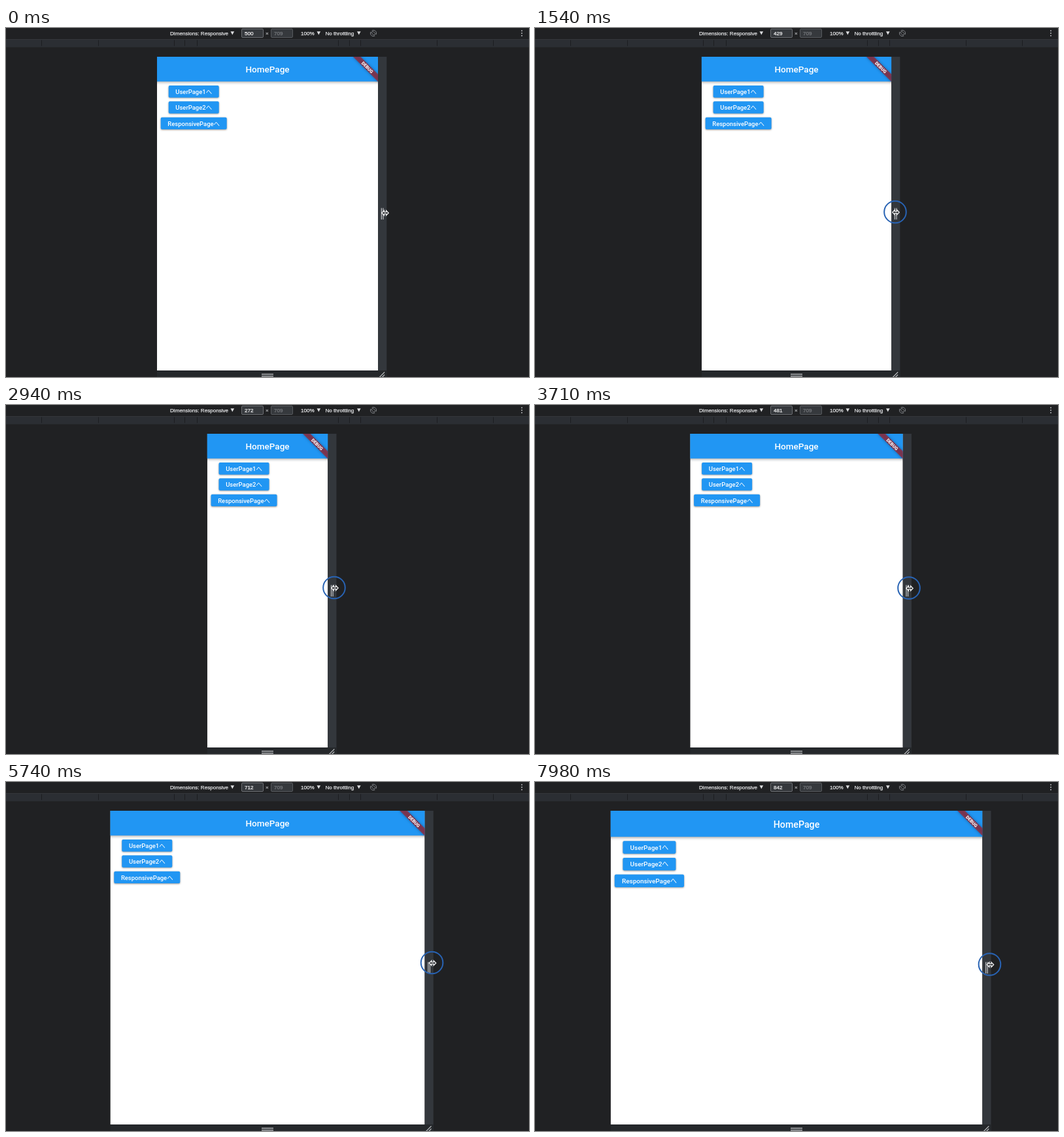
Recreate the animation shown at these times as an HTML page with a canvas. Size 800 px wide and 534 px high, loop 8 s.

```html
<!DOCTYPE html>
<html lang="en">
<head>
<meta charset="utf-8">
<title>Responsive resize</title>
<style>
html, body { margin: 0; width: 100%; height: 100%; overflow: hidden; background: #202123; }
canvas { display: block; width: 800px; height: 534px; }
</style>
</head>
<body>
<canvas id="stage"></canvas>
<script>
const W = 800, H = 534, LOOP = 8000, STEP = 70;
const UNIT = 0.675;          // stage pixels per device pixel
const TOP = 44, BOTTOM = 524;
const BLUE = '#2196f3', BACK = '#202123';
const UI = '"Liberation Sans", Arial, sans-serif';
const APP = 'Roboto, "Noto Sans CJK JP", "Noto Sans CJK", sans-serif';

// Keys are [time, value]
const widthKeys = [[0, 500], [700, 500], [840, 498], [1540, 429], [2450, 280], [2800, 271], [2940, 272],
  [3200, 300], [4060, 590], [4480, 629], [4760, 638], [5040, 638], [5740, 712],
  [6720, 807], [7210, 815], [7350, 815], [7980, 842]];
const offsetKeys = [[0, 10.9], [490, 6], [1540, 6.8], [2940, 10.7], [4480, 9.9],
  [5740, 12], [6720, 10.4], [7980, 12.1]];
const yKeys = [[0, 283], [490, 279.5], [1540, 282], [2940, 280], [4480, 281],
  [5740, 277], [6720, 280.5], [7980, 279.5]];
const PRESS = 560;

const canvas = document.getElementById('stage');
const dpr = window.devicePixelRatio || 1;
canvas.width = W * dpr;
canvas.height = H * dpr;
const c = canvas.getContext('2d');

// Monotone cubic through the keys, so holds stay flat
function sample(keys, t) {
  const last = keys.length - 1;
  if (t >= keys[last][0]) return keys[last][1];
  let i = 0;
  while (t >= keys[i + 1][0]) i++;
  const slope = j => (keys[j + 1][1] - keys[j][1]) / (keys[j + 1][0] - keys[j][0]);
  const tangent = j => {
    if (j === 0) return slope(0);
    if (j === last) return slope(last - 1);
    const a = slope(j - 1), b = slope(j);
    return a * b <= 0 ? 0 : 2 * a * b / (a + b);
  };
  const [t0, v0] = keys[i], [t1, v1] = keys[i + 1];
  const d = t1 - t0, u = (t - t0) / d, u2 = u * u, u3 = u2 * u;
  return v0 * (2 * u3 - 3 * u2 + 1) + v1 * (3 * u2 - 2 * u3)
    + d * (tangent(i) * (u3 - 2 * u2 + u) + tangent(i + 1) * (u3 - u2));
}

function rect(x, y, w, h, color) {
  c.fillStyle = color;
  c.fillRect(x, y, w, h);
}

function line(color, width, ...points) {
  c.strokeStyle = color;
  c.lineWidth = width;
  c.beginPath();
  points.forEach(([x, y]) => c.lineTo(x, y));
  c.stroke();
}

function text(s, x, y, font, color, align = 'left') {
  c.font = font;
  c.fillStyle = color;
  c.textAlign = align;
  c.fillText(s, x, y);
}

function shadow(color, blur, y) {
  c.shadowColor = color;
  c.shadowBlur = blur * dpr;
  c.shadowOffsetY = y * dpr;
}

function label(s, x, color = '#e3e4e6') {
  text(s, x, 11, '8.1px ' + UI, color);
  c.strokeStyle = color;
  c.lineWidth = 0.25;
  c.strokeText(s, x, 11);
}

function dropMark(x) {
  c.fillStyle = '#dcdddf';
  c.beginPath();
  c.moveTo(x, 5.3);
  c.lineTo(x + 5.6, 5.3);
  c.lineTo(x + 2.8, 10.6);
  c.fill();
}

function field(x, value, color, border) {
  c.beginPath();
  c.roundRect(x + 0.5, 1.5, 33, 13, 1.5);
  c.fillStyle = '#36393d';
  c.fill();
  c.strokeStyle = border;
  c.lineWidth = 1;
  c.stroke();
  label(value, x + 5, color);
}

function drawToolbar(n) {
  rect(0, 17, W, 1, '#34373b');
  rect(0, 18, W, 11.5, '#2b2e33');
  for (const x of [54, 141, 257, 273, 292, 508, 525, 542, 659, 745]) rect(x, 18.5, 1, 9, '#1c1d20');
  label('Dimensions: Responsive', 251);
  dropMark(343.5);
  field(360, String(n), '#f1f1f2', '#6a6d71');
  label('×', 397, '#b0b2b5');
  field(405, '709', '#777a7e', '#56595d');
  label('100%', 451);
  dropMark(475.5);
  label('No throttling', 488.5);
  dropMark(537);

  c.save();
  c.translate(562, 8);
  c.strokeStyle = '#8b8e92';
  c.lineWidth = 0.9;
  c.beginPath();
  c.arc(0, 0, 4.6, -2.1, 0.5);
  c.stroke();
  c.beginPath();
  c.arc(0, 0, 4.6, 1.05, 3.65);
  c.stroke();
  c.rotate(Math.PI / 4);
  c.strokeRect(-2.8, -1.7, 5.6, 3.4);
  c.restore();

  for (const y of [4.2, 8, 11.8]) {
    c.fillStyle = '#b4b6b9';
    c.beginPath();
    c.arc(789, y, 1, 0, 7);
    c.fill();
  }
}

function drawButton(s, x, y, w) {
  c.save();
  shadow('rgba(0,0,0,.42)', 2.6, 0.9);
  c.fillStyle = BLUE;
  c.beginPath();
  c.roundRect(x, y, w, 18.4, 2);
  c.fill();
  c.restore();
  text(s, x + w / 2, y + 12.8, '500 9.45px ' + APP, '#fff', 'center');
}

function drawBanner(right) {
  c.save();
  c.translate(right, TOP);
  c.rotate(Math.PI / 4);
  c.scale(UNIT, UNIT);
  c.save();
  shadow('rgba(0,0,0,.5)', 6 * UNIT, 0);
  rect(-40, 28, 80, 12, 'rgba(168,28,38,.68)');
  c.restore();
  text('DEBUG', 0, 37.7, '900 10.2px ' + APP, '#fff', 'center');
  c.restore();
}

function drawApp(n, half) {
  const left = 400 - half, right = 400 + half;
  const zoom = Math.max(1, n / 800);   // layout scales up past 800
  c.save();
  c.beginPath();
  c.rect(left, TOP, half * 2, BOTTOM - TOP);
  c.clip();
  rect(left, TOP, half * 2, BOTTOM - TOP, '#fff');

  c.save();
  c.translate(left, TOP);
  c.scale(zoom, zoom);
  const w = half * 2 / zoom;
  c.save();
  shadow('rgba(0,0,0,.4)', 4.5, 1.6);
  rect(-8, -8, w + 16, 45.8, BLUE);
  c.restore();
  text('HomePage', w / 2, 24.4, '500 13.5px ' + APP, '#fff', 'center');
  drawButton('UserPage1へ', 17.8, 44, 77);
  drawButton('UserPage2へ', 17.8, 68.3, 77);
  drawButton('ResponsivePageへ', 5.8, 92.7, 101);
  c.restore();

  drawBanner(right);
  c.restore();
}

function drawHandles(half) {
  const left = 400 - half, right = 400 + half, grip = '#b9bbbe';
  rect(right, TOP, 13.2, H - TOP, '#33373c');
  rect(left, BOTTOM, half * 2 + 13.2, H - BOTTOM, '#25282b');
  for (const x of [4.6, 7.2]) rect(right + x, 275.5, 1.3, 17.5, grip);
  for (const y of [529, 532]) rect(391, y, 18, 1.4, grip);
  line(grip, 1.2, [right + 2, 534.5], [right + 10, 526.5]);
  line(grip, 1.2, [right + 6, 534.5], [right + 10, 530.5]);
}

function drawCursor(x, y, pressed) {
  if (pressed) {
    c.strokeStyle = '#2863b4';
    c.lineWidth = 2;
    c.beginPath();
    c.arc(x - 1, y - 0.5, 16.8, 0, 7);
    c.stroke();
  }
  c.save();
  c.translate(x, y);
  c.beginPath();
  for (const [px, py] of [[-5.2, 0], [-1.6, -3.6], [-1.6, -1.3], [1.6, -1.3], [1.6, -3.6],
    [5.2, 0], [1.6, 3.6], [1.6, 1.3], [-1.6, 1.3], [-1.6, 3.6]]) c.lineTo(px, py);
  c.closePath();
  c.fillStyle = '#25272a';
  c.fill();
  c.strokeStyle = '#f0f0f1';
  c.lineWidth = 1.3;
  c.stroke();
  c.restore();
}

function draw(now) {
  const t = Math.floor((now % LOOP) / STEP) * STEP;
  const n = Math.round(sample(widthKeys, t));
  const half = 0.337 * n + 0.6;
  c.setTransform(dpr, 0, 0, dpr, 0, 0);
  rect(0, 0, W, H, BACK);
  drawToolbar(n);
  drawHandles(half);
  drawApp(n, half);
  drawCursor(400 + half + sample(offsetKeys, t), sample(yKeys, t), t >= PRESS);
}

const start = performance.now();
function tick() {
  draw(performance.now() - start);
  requestAnimationFrame(tick);
}
tick();
</script>
</body>
</html>
```
